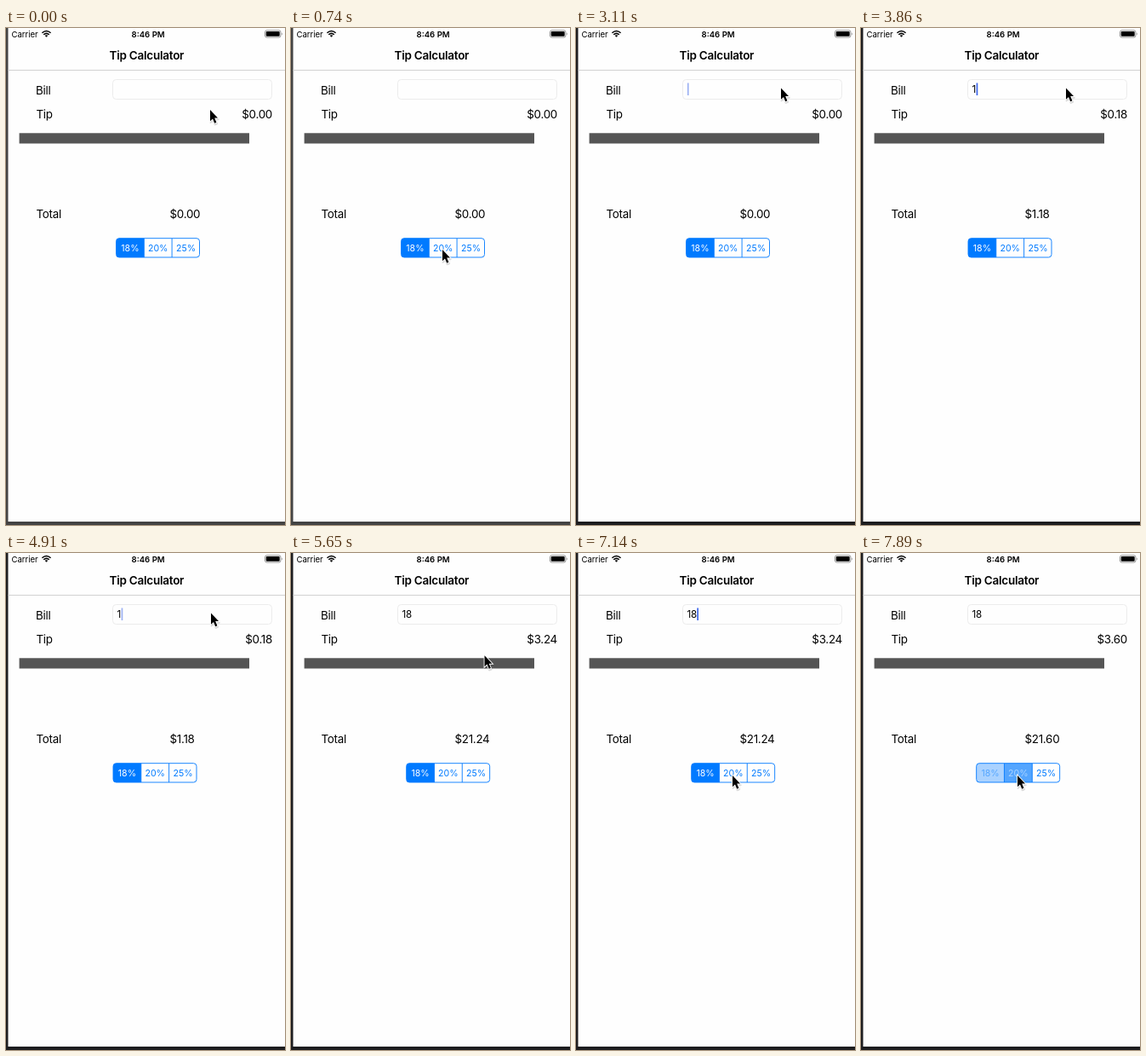
An HTML page for the animation above (8000 ms loop, 328 by 583 pixels).

```html
<!DOCTYPE html>
<html lang="en">
<head>
<meta charset="utf-8">
<title>Tip Calculator</title>
<style>
  html, body { margin: 0; width: 100%; height: 100%; overflow: hidden; background: #fff; }
  svg { display: block; width: 328px; height: 583px; }
  text { font-family: Inter, "Open Sans", sans-serif; fill: #000; }
  .label { font-size: 13.4px; letter-spacing: -.28px; }
  .title { font-size: 13.5px; font-weight: 600; letter-spacing: -.25px; }
  .status { font-size: 9.6px; letter-spacing: -.05px; }
  .time { font-size: 9.6px; font-weight: 600; }
  .input { font-size: 11.6px; letter-spacing: -.3px; }
  .segment { font-size: 10.6px; }
  .mid { text-anchor: middle; }
  .end { text-anchor: end; }
</style>
</head>
<body>
<svg viewBox="0 0 328 583">
  <rect id="desk" width="328" height="583"/>
  <path d="M2.5 0H328V579H2.5Z" fill="#fefefe"/>
  <path d="M2.5 49.5H328" stroke="#d2d2d2"/>

  <text class="status" x="6.5" y="10.6">Carrier</text>
  <g fill="none" stroke="#000" stroke-width="1.5">
    <path d="M42.4 5.8Q47.5 1.1 52.6 5.8M44.2 7.8Q47.5 4.9 50.8 7.8"/>
    <path d="M45.6 8.8Q47.5 7.5 49.4 8.8L47.5 10.8Z" fill="#000" stroke="none"/>
  </g>
  <text class="time mid" x="167.1" y="10.6">8:46 PM</text>
  <rect x="304.5" y="2.8" width="18.4" height="8.2" rx="2" fill="none" stroke="#777" stroke-width=".8"/>
  <rect x="305.7" y="4" width="16" height="5.8" rx="1"/>
  <path d="M324 5.2Q325.6 6.9 324 8.6Z" fill="#777"/>

  <text class="title mid" x="165.4" y="37">Tip Calculator</text>

  <text class="label" x="35" y="77.5">Bill</text>
  <text class="label" x="35.5" y="106">Tip</text>
  <text class="label" x="35.5" y="223">Total</text>
  <rect x="125.5" y="60.5" width="187" height="23" rx="4" fill="none" stroke="#ececec"/>
  <text class="input" id="bill" x="130.6" y="76.2"></text>
  <rect id="caret" y="64.5" width="1.7" height="14.5" fill="#3d66ea"/>
  <text class="label end" id="tip" x="313" y="106"></text>
  <text class="label" id="total" x="192.5" y="223"></text>
  <rect x="15.6" y="123.3" width="270.4" height="12.2" fill="#555"/>

  <g id="segments">
    <clipPath id="round"><rect y="246.7" width="98" height="22.3" rx="3.5"/></clipPath>
    <g id="fills" clip-path="url(#round)" fill="#007aff"></g>
    <path d="M32.8 247V269M65.6 247V269" stroke="#007aff" stroke-width=".9"/>
    <rect y="246.7" width="98" height="22.3" rx="3.5" fill="none" stroke="#007aff" stroke-width=".9"/>
    <g id="names"></g>
  </g>

  <g id="pointer">
    <path d="M0 0V13.2L3 10.4 5.2 15.7 7.4 14.8 5.2 9.6H9Z" transform="translate(.5 1.4)"
          stroke="#000" stroke-width="2.4" stroke-linejoin="round" opacity=".14"/>
    <path d="M0 0V13.2L3 10.4 5.2 15.7 7.4 14.8 5.2 9.6H9Z"
          stroke="#fff" stroke-width="1.8" paint-order="stroke"/>
  </g>
</svg>
<script>
const LOOP = 8000, STEP = 149, LEAD = 22;

// Moments, counted in screen refreshes of STEP ms.
const ACTIVATE = 15, FOCUS = 18, FIRST_KEY = 26, SECOND_KEY = 34, TAP = 51, RATE_CHANGE = 53;
const BLINK = 7;

const HOME = { x: 240, y: 96 };
const moves = [
  { from: 0, to: 2, x: 196, y: 238 },
  { from: 3, to: 5, x: 178, y: 260 },
  { from: 9, to: 13, x: 247, y: 61 },
  { from: 16, to: 17, x: 241, y: 70.5 },
  { from: 36, to: 42, x: 189, y: 262 },
  { from: 45, to: 48, x: 184, y: 261 }
];

const $ = id => document.getElementById(id);
const clamp = v => Math.min(1, Math.max(0, v));
const smooth = v => v * v * (3 - 2 * v);
const money = v => "$" + v.toFixed(2);

function pointerAt(k) {
  return moves.reduce((p, m) => {
    const e = smooth(clamp((k - m.from) / (m.to - m.from)));
    return { x: p.x + (m.x - p.x) * e, y: p.y + (m.y - p.y) * e };
  }, HOME);
}

// Solid, then fading out and in again; typing restarts the cycle.
function caretOpacity(k) {
  if (k < FOCUS) return 0;
  const phase = (k - (k < FIRST_KEY ? FOCUS : FIRST_KEY + 1)) % BLINK;
  return clamp((Math.abs(phase - 4.5) - .5) / 2);
}

// The control ends flush with the total, whose digit 1 is narrower than the rest.
function segmentsLeft(total) {
  const ones = total.split("1").length - 1;
  return 129.5 + 7.9 * (total.length - 5) - 1.75 * ones;
}

function add(parent, tag, attrs) {
  const el = document.createElementNS("http://www.w3.org/2000/svg", tag);
  for (const key in attrs) el.setAttribute(key, attrs[key]);
  return parent.appendChild(el);
}

const segments = ["18%", "20%", "25%"].map((name, i) => {
  const fill = add($("fills"), "rect", { x: i * 32.8, y: 246, width: 32.8, height: 24 });
  const text = add($("names"), "text", { x: 16.4 + i * 32.8, y: 261.7, class: "segment mid" });
  text.textContent = name;
  return { fill, text };
});

function draw(t) {
  const k = Math.floor((t + LEAD) / STEP);
  const typed = (k >= FIRST_KEY) + (k >= SECOND_KEY);
  const bill = "18".slice(0, typed);
  const tip = bill * (k < RATE_CHANGE ? .18 : .2);
  const total = money(+bill + tip);

  $("bill").textContent = bill;
  $("tip").textContent = money(tip);
  $("total").textContent = total;
  $("segments").setAttribute("transform", `translate(${segmentsLeft(total)} 0)`);

  $("caret").setAttribute("x", 130.9 + 5.7 * typed - (typed === 1));
  $("caret").setAttribute("opacity", caretOpacity(k));

  const { x, y } = pointerAt(k);
  $("pointer").setAttribute("transform", `translate(${x} ${y})`);
  $("desk").setAttribute("fill", k < ACTIVATE ? "#434343" : "#1d1d1f");

  const fade = clamp((k - TAP) / 3);
  [1 - fade, fade, 0].forEach((amount, i) => {
    segments[i].fill.setAttribute("opacity", amount);
    segments[i].text.style.fill = `rgb(${255 * amount},${122 + 133 * amount},255)`;
  });
}

const start = performance.now();
function tick() {
  draw((performance.now() - start) % LOOP);
  requestAnimationFrame(tick);
}
tick();
</script>
</body>
</html>
```
